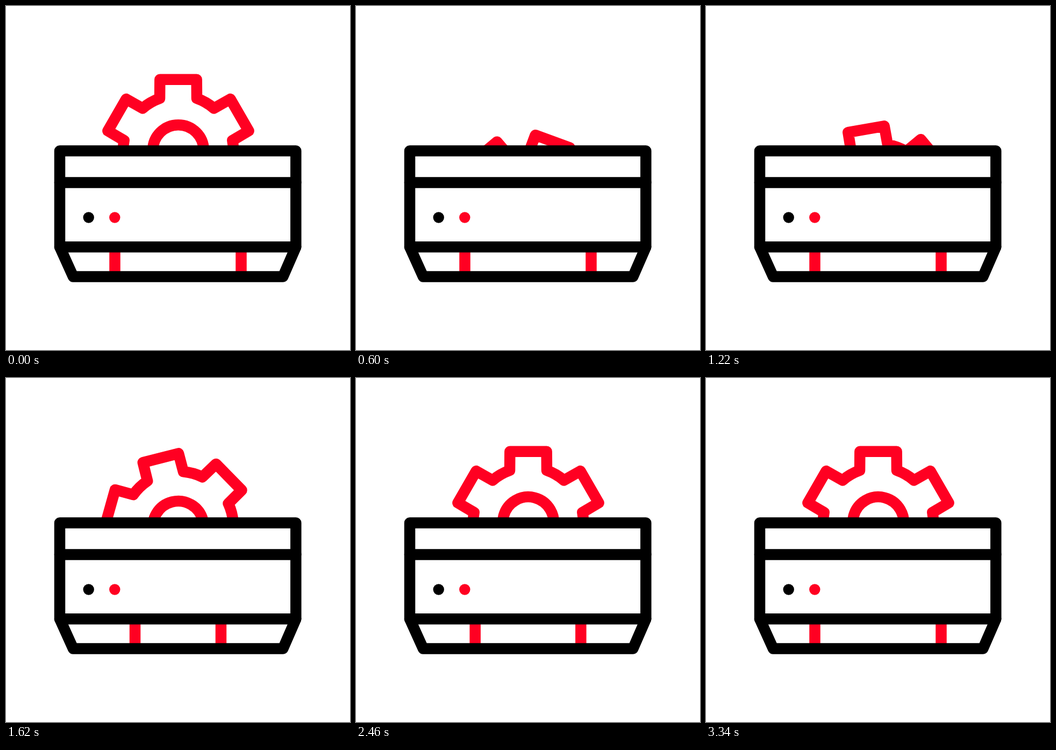
Write an HTML page with a canvas that moves like this. It is 640 px wide and 640 px high and loops after 3.6 s.

```html
<!DOCTYPE html>
<html lang="en">
<head>
<meta charset="utf-8">
<title>Device with gear</title>
<style>
  html, body { margin: 0; width: 100%; height: 100%; overflow: hidden; background: #fff; }
  canvas { display: block; width: 640px; height: 640px; }
</style>
</head>
<body>
<canvas id="stage" width="640" height="640"></canvas>
<script>
const LOOP = 3600, RED = '#ff0022', BLACK = '#000', LINE = 20.5;
const FOOT_SPREAD = 117.5;
const ctx = document.getElementById('stage').getContext('2d');

// Keys are [time in ms, value, speed per ms]; speed defaults to 0.
const GEAR_DROP = [[200, 0], [820, 150], [1750, 0]];
const GEAR_ANGLE = [[200, 0], [600, 20, .115], [1220, 110, .145], [1840, 195, .134], [2360, 240]];
const FOOT_OFFSET = [[1455, FOOT_SPREAD], [1895, 0], [2365, 109.5], [2850, 0], [3340, FOOT_SPREAD]];

// Cubic Hermite interpolation between keys, held at both ends.
function track(keys, time) {
  if (time <= keys[0][0]) return keys[0][1];
  const next = keys.findIndex(key => key[0] > time);
  if (next < 0) return keys[keys.length - 1][1];
  const [t0, a, va = 0] = keys[next - 1], [t1, b, vb = 0] = keys[next];
  const span = t1 - t0, u = (time - t0) / span, w = 1 - u;
  return a + (b - a) * u * u * (3 - 2 * u) + span * u * w * (va * w - vb * u);
}

function polyline(points, closed) {
  ctx.beginPath();
  points.forEach(([x, y]) => ctx.lineTo(x, y));
  if (closed) ctx.closePath();
  ctx.stroke();
}

function dot(x, radius, color) {
  ctx.fillStyle = color;
  ctx.beginPath();
  ctx.arc(x, 393.5, radius, 0, 7);
  ctx.fill();
}

function drawGear(drop, degrees) {
  const step = Math.PI / 3, tip = .254, root = .343;
  ctx.save();
  ctx.beginPath();
  ctx.rect(0, 0, 640, 268);
  ctx.clip();
  ctx.translate(320.5, 268.5 + drop);
  ctx.rotate(degrees * Math.PI / 180);
  ctx.strokeStyle = RED;
  ctx.beginPath();
  for (let i = 0; i < 6; i++) {
    const mid = i * step - Math.PI / 2;
    for (const a of [mid - tip, mid + tip]) ctx.lineTo(136 * Math.cos(a), 136 * Math.sin(a));
    ctx.arc(0, 0, 102.5, mid + root, mid + step - root);
  }
  ctx.closePath();
  ctx.stroke();
  ctx.beginPath();
  ctx.arc(0, 0, 47.3, 0, 7);
  ctx.stroke();
  ctx.restore();
}

function drawBody() {
  ctx.strokeStyle = BLACK;
  polyline([[100, 269.5], [539.3, 269.5], [539.3, 448.3], [100, 448.3]], true);
  polyline([[100, 328.5], [539.3, 328.5]]);
  polyline([[100, 448.3], [125, 503.5], [515.3, 503.5], [539.3, 448.3]]);
}

function draw(time) {
  ctx.fillStyle = '#fff';
  ctx.fillRect(0, 0, 640, 640);
  ctx.lineWidth = LINE;
  ctx.lineJoin = ctx.lineCap = 'round';

  drawGear(track(GEAR_DROP, time), track(GEAR_ANGLE, time));

  const offset = track(FOOT_OFFSET, time);
  ctx.fillStyle = RED;
  for (const side of [-1, 1]) ctx.fillRect(320 + side * offset - LINE / 2, 450, LINE, 52);

  drawBody();

  // The dots grow and trade colours while the feet are close together.
  const pulse = 1 - 2 * offset / FOOT_SPREAD, swapped = pulse > 0;
  const radius = 10.2 + 1.6 * Math.max(0, pulse);
  dot(153.7, radius, swapped ? RED : BLACK);
  dot(202.3, radius, swapped ? BLACK : RED);
}

const start = performance.now();
function tick() {
  draw((performance.now() - start) % LOOP);
  requestAnimationFrame(tick);
}
tick();
</script>
</body>
</html>
```
